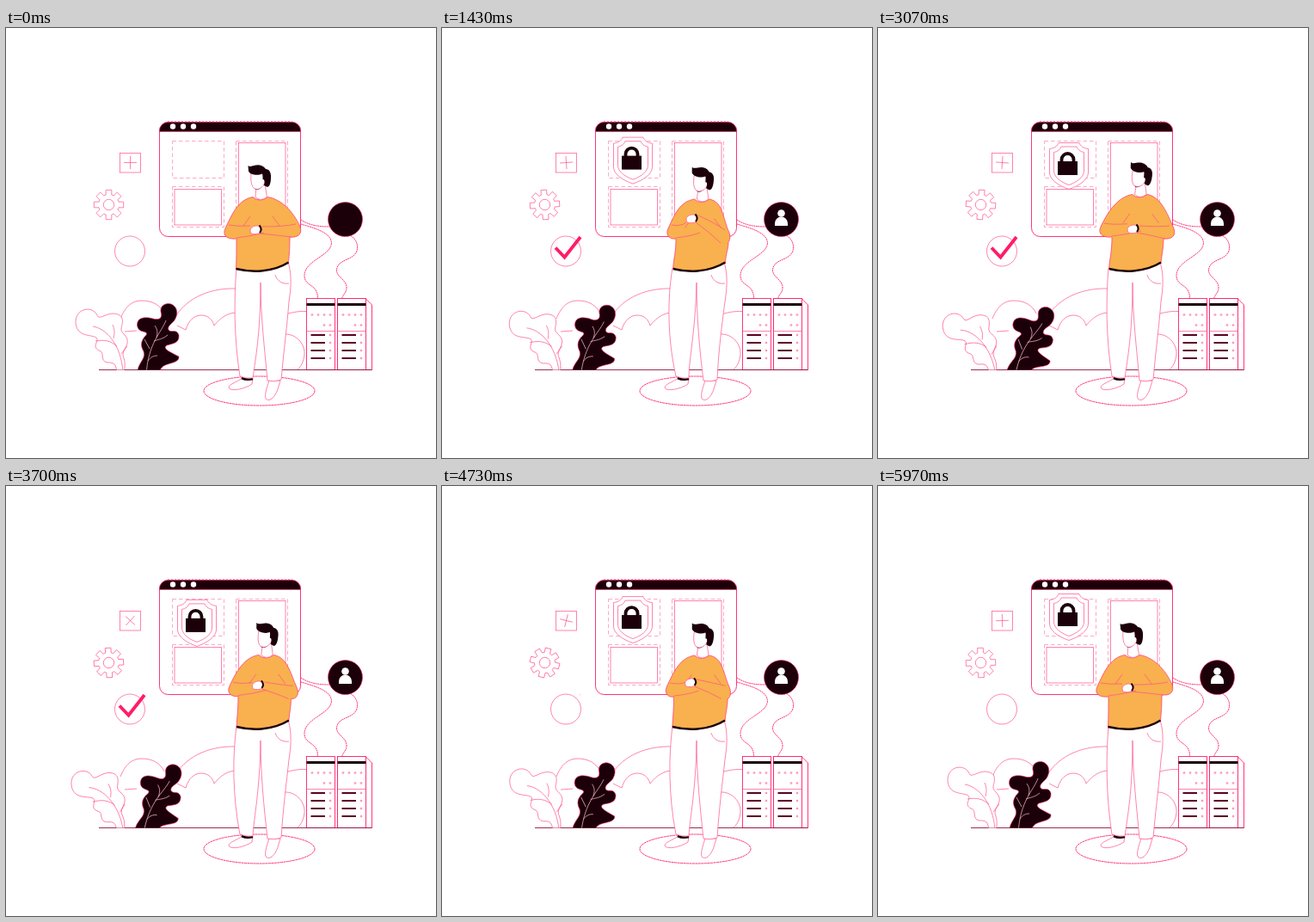
An HTML page that plays this animation: 500x500 px, repeating every 6000 ms.

```html
<!DOCTYPE html>
<html lang="en">
<head>
<meta charset="utf-8">
<style>
  html, body { margin: 0; width: 100%; height: 100%; overflow: hidden; background: #fff; }
  svg { display: block; width: 100vw; height: 100vh; }
  .line { fill: none; stroke: #ff4f8c; stroke-width: .7; }
  .solid { fill: #fff; stroke: #ff4f8c; stroke-width: .7; }
  .strong { stroke: #ff1f6c; stroke-width: .9; }
  .dark { fill: #1c0009; stroke: #ff2a74; stroke-width: .6; }
  .ink { fill: #1c0009; }
  .white { fill: #fff; }
  .dash { stroke: #ff85ae; stroke-dasharray: 4.5 3; }
  .vein { fill: none; stroke: #ffc4d8; stroke-width: .7; }
  .shirt { fill: #f9b04e; stroke: #ff2a74; stroke-width: .7; }
</style>
</head>
<body>
<svg viewBox="0 0 500 500">
  <defs><clipPath id="above"><path d="M0 0H500V397.5H0Z"/></clipPath></defs>

  <!-- clouds -->
  <g class="line">
    <path d="M133 338C139 323 147 317 158 317C171 317 180 323 184 332"/>
    <path d="M198 334C212 313 238 302 268 303"/>
    <path d="M199 346L209 351C212 340 219 334 227 334C235 334 240 339 242 346C249 337 258 331 268 331"/>
    <path d="M322 334C330 331 340 329 349 329.5M323 356C338 355 348 368 347 380C346 388 343 394 339 397M138 353L152 352"/>
  </g>

  <!-- browser window -->
  <rect class="solid strong" x="178.5" y="109.5" width="164" height="133" rx="10"/>
  <path class="dark" d="M178.500 120.500V119.500A10 10 0 0 1 188.500 109.500H332.500A10 10 0 0 1 342.500 119.500V120.500Z"/>
  <path d="M188 109H333" stroke="#ff2a74" stroke-dasharray="2 2"/>
  <g class="white"><circle cx="194" cy="114.500" r="3.200"/><circle cx="206" cy="114.500" r="3.200"/><circle cx="218" cy="114.500" r="3.200"/></g>
  <g class="line">
    <rect class="dash" x="193.500" y="131.500" width="60" height="43"/>
    <rect class="dash" x="193.500" y="184.500" width="60" height="47"/>
    <rect class="dash" x="267.500" y="131.500" width="60" height="100"/>
    <rect x="196" y="187.500" width="54.500" height="41.500"/>
    <rect x="270.500" y="133.500" width="54.500" height="95"/>
  </g>
  <g id="shield">
    <path class="solid" d="M210 125.500H234C235 129 239 132 244.500 132.500V160C244.500 168 235 175 222 179.500C209 175 199.500 168 199.500 160V132.500C205 132 209 129 210 125.500Z"/>
    <path class="line" d="M213 130H231C232 133 235 136 239.500 136.500V158C239.500 165 232 171 222 174.500C212 171 204.500 165 204.500 158V136.500C209 136 212 133 213 130Z"/>
    <rect class="ink" x="209" y="147" width="23" height="16"/>
    <path d="M213.500 148V145A7 7 0 0 1 227.500 145V148" fill="none" stroke="#1c0009" stroke-width="3.800"/>
  </g>

  <!-- floating icons -->
  <rect class="line" x="132.500" y="145.500" width="24" height="22.500"/>
  <path id="plus" class="line" d="M137 156.500H152M144.500 149V164"/>
  <g id="gear"><path id="cog" class="line"/><circle class="line" cx="119.500" cy="205.500" r="6.200"/></g>
  <circle class="line" cx="144" cy="259.500" r="17.500"/>
  <path id="check" d="M132 255.500L142.500 266.500L161 243" pathLength="100" fill="none" stroke="#ff1c69" stroke-width="3.800"/>

  <!-- cables, account badge, servers -->
  <g class="line strong" stroke-dasharray="2 .6">
    <path d="M343 223C350 228 360 231 376 231"/>
    <path d="M343 228C356 232 378 237 378.500 250C378 265 347 270 347 288C347 301 363 297 362.500 315"/>
    <path d="M398 240C407 244 410 252 408 259C404 271 386 268 384.500 281C384 290 396 292 396 302C396 308 392 309 390.500 315"/>
  </g>
  <circle class="dark" cx="394.500" cy="222.500" r="20"/>
  <g id="user" class="white"><circle cx="394.500" cy="215.500" r="4.300"/><path d="M387 230V227A7.500 7.500 0 0 1 402 227V230Z"/></g>
  <path class="solid strong" d="M385.500 314.500H418L425.500 322V397.500H385.500ZM418 314.500V397.500"/>
  <g id="servers"></g>
  <path d="M108 397.500H425.500" stroke="#8d1743" stroke-width=".9"/>

  <!-- leaves -->
  <g clip-path="url(#above)">
    <g id="paleLeaf">
      <path class="solid" d="M129 402C128 390 126 389 118 389C108 387 116 377 108 375C99 370 109 364 105 360C99 356 81 360 81 341C82 325 101 323 106 334C108 340 115 332 125 332C138 333 136 342 134 349C133 356 143 357 141 367C139 373 134 377 137 384C139 390 138 396 137 402Z"/>
      <path class="line" d="M101 347C116 349 134 368 136 400M124 345C127 352 126 356 125 361M104 364C115 362 122 364 129 370M141 370L134 379"/>
    </g>
    <g id="darkLeaf">
      <path class="dark" d="M152 404C153 388 163 386 160 376C155 368 158 362 163 357C166 351 154 356 152.500 346C152 335 164 336 171 338C179 340 182 337 180 330C179 323 185 320 190 320.500C198 322 201 330 197 338C195 343 187 346 189 351C192 355 198 349 201 357C202 367 193 367 187 369C181 373 192 377 201 382C202 390 188 389 182 394L174 404Z"/>
      <path class="vein" d="M186 340C181 354 165 366 163 404M173 346C177 352 176 355 175 360M188 357C182 362 177 362 172 364M161 362L167 373M176 381C171 381 168 383 165 387"/>
    </g>
  </g>

  <!-- man -->
  <ellipse class="line strong" cx="294.500" cy="422" rx="64.500" ry="17" stroke-dasharray="3 .5"/>
  <path class="solid" d="M275 407C268 412 259 414 259 418.500C262 423 277 420 286 414L287 407Z"/>
  <path class="solid" d="M306 410C303 419 300 428 302.500 431.500C307 435 313 429 316 420L319 410Z"/>
  <path d="M274 407C278 409 283 409 287 408" fill="none" stroke="#1c0009" stroke-width="2.600"/>
  <path id="legs" class="solid"/>
  <path class="line" d="M313 287C315 294 321 298 329 297"/>
  <path id="torso" class="shirt"/>
  <path id="hem" fill="none" stroke="#1c0009" stroke-width="2.600"/>
  <path id="folds" class="line"/>
  <g id="hand">
    <path class="solid" d="M-6 1C-6 -3 -2 -5 2 -5L7 -4L6 3C3 5 -2 5 -5 4Z"/>
    <path d="M4.500 -5.500Q8.500 -1 5 3" fill="none" stroke="#1c0009" stroke-width="2"/>
  </g>
  <path id="neck" class="solid"/>
  <g id="head">
    <path class="ink" d="M289 187Q293 190 297 185L292 185Z"/>
    <path class="solid" d="M285 168C284 180 286 187.500 292 187.500C297 187 300 183 301 179L300 167Z"/>
    <path class="ink" d="M281.500 160C285 163 290 157.500 297 160C300 161 301 163 302 164C306 164 308.500 168 308 174C308 181 306 186 303 184.500L300 183C301 179 301 177 299.500 176C298 178 299 172 298 169.500C293 172 284 171 282 166.500Z"/>
  </g>
</svg>

<script>
const LOOP = 6000;
const $ = id => document.getElementById(id);
const set = (id, name, value) => $(id).setAttribute(name, value);
const clamp = x => Math.max(0, Math.min(1, x));
const ease = (t, from, to) => { const x = clamp((t - from) / (to - from)); return x * x * (3 - 2 * x); };

// time, headX, headY, left elbow x y, right elbow x y, hand x y, left side, right side, knee
const poses = [
  [0, 0, 0, 254, 238, 342, 237, 290, 235, 268, 330, 0],
  [1430, 8.500, 2.500, 262, 238, 334, 244, 290, 222, 272, 333, -3],
  [2170, 7.500, -1, 259, 238, 338, 238, 289, 227, 270, 331, 0],
  [3070, 11.500, -3, 258, 236, 344, 239, 296, 234, 272, 332, 0],
  [4330, 6.500, 2.500, 260, 239, 333, 243, 288, 229, 268, 331, -3],
  [5130, 10, -2, 260, 237, 338, 239, 290, 230, 271, 333, 0]
];

// Periodic cubic through the poses
function poseAt(t) {
  const n = poses.length;
  const key = i => {
    const turn = Math.floor(i / n), p = poses[i - turn * n];
    return [p[0] + turn * LOOP, ...p.slice(1)];
  };
  let i = n - 1;
  while (poses[i][0] > t) i--;
  const [a, b, c, d] = [key(i - 1), key(i), key(i + 1), key(i + 2)];
  const span = c[0] - b[0], u = (t - b[0]) / span, v = 1 - u;
  return b.slice(1).map((y0, j) => {
    const k = j + 1, y1 = c[k];
    const m0 = (y1 - a[k]) / (c[0] - a[0]) * span;
    const m1 = (d[k] - y0) / (d[0] - b[0]) * span;
    return y0 * (1 + 2 * u) * v * v + m0 * u * v * v + y1 * u * u * (3 - 2 * u) - m1 * u * u * v;
  });
}

function buildGear() {
  const points = [];
  for (let tooth = 0; tooth < 8; tooth++) {
    for (const [deg, r] of [[-16, 12], [-11, 17.500], [11, 17.500], [16, 12]]) {
      const a = (tooth * 45 + deg) * Math.PI / 180;
      points.push((119.500 + r * Math.sin(a)).toFixed(2) + ' ' + (205.500 - r * Math.cos(a)).toFixed(2));
    }
  }
  set('cog', 'd', 'M' + points.join('L') + 'Z');
}

function buildServers() {
  const light = (x, y) => `<circle class="line" cx="${x}" cy="${y}" r=".9"/>`;
  $('servers').innerHTML = [349.500, 385.500].map(x => {
    let s = `<rect class="solid strong" x="${x}" y="314.500" width="33" height="83"/>
      <rect class="ink" x="${x}" y="320" width="33" height="3"/>
      <path class="line" d="M${x} 352.500h33"/>`;
    for (const dx of [6.500, 13.500, 20.500, 27.500]) s += light(x + dx, 333.500);
    s += light(x + 20.500, 345.500) + light(x + 27.500, 345.500);
    for (const y of [357, 366, 375, 384]) {
      s += `<path d="M${x + 5} ${y}h16.500" stroke="#5c0024" stroke-width="2"/>` + light(x + 27.500, y);
    }
    return s;
  }).join('');
}

function drawMan(t) {
  const [hx, hy, ex, ey, rx, ry, px, py, sl, sr, knee] = poseAt(t);
  const cx = hx * .75, cy = hy, nl = 287 + cx, nr = 304.500 + cx, ny = 196.500 + cy;
  const hl = 267.500 + (sl - 268) * .3, hr = 328.500 + (sr - 330) * .3;
  const hem = `C284 284 309 285 ${hr} 272.500`;
  set('head', 'transform', `translate(${hx * .8} ${hy}) rotate(${hx * .6} 292 187)`);
  set('neck', 'd', `M${291 + hx * .8} ${185 + hy}L${nl + 3} ${ny}Q${nl + 9} ${ny + 6} ${nr - 1} ${ny}L${301 + hx * .8} ${181 + hy}Z`);
  set('hand', 'transform', `translate(${px} ${py})`);
  set('torso', 'd', `M${nl} ${ny}C${nl - 17} ${ny + 3} ${ex + 9} ${ey - 22} ${ex + 1} ${ey - 5}
    C${ex - 3} ${ey + 4} ${ex + 4} ${ey + 8} ${sl} ${ey + 7}
    C${sl} 262 ${hl + .5} 268 ${hl} 280${hem}
    C${hr + 1} 262 ${sr} 256 ${sr} ${ry + 6}
    C${rx - 3} ${ry + 7} ${rx + 3} ${ry + 3} ${rx} ${ry - 6}
    C${rx - 8} ${ry - 24} ${nr + 16} ${ny + 3} ${nr} ${ny}Q${nl + 8} ${ny + 7} ${nl} ${ny}Z`);
  set('hem', 'd', `M${hl} 280${hem}`);
  set('folds', 'd', `M${ex + 5} ${ey - 9}Q${ex + 16} ${ey - 7} ${px - 6} ${ey - 8 + (py - 235) * .3}
    M${sl} ${ey + 6}Q${sl + 18} ${ey + 4} ${px + 10} ${ey}
    M${px + 8} ${py - 4}Q${(px + rx) / 2 + 8} ${(py + ry) / 2 - 5} ${rx - 5} ${ry - 9}
    M${px + 5} ${py + 4}Q${(px + rx) / 2} ${(py + ry) / 2 + 5} ${rx - 10} ${ry + 6}
    M${284 + cx} ${219 + cy}l-8 11M${310 + cx} ${219 + cy}l8 11`);
  set('legs', 'd', `M268 279C${265 + knee} 315 ${265 + knee} 360 272 405Q279 408 287 407
    C${290 + knee} 385 ${296 + knee * .5} 355 296 296C296 335 ${301 + knee * .5} 375 304 410Q312 412 320 409
    C${323 + knee * .5} 375 ${327 + knee * .5} 345 329 318C331 305 333 288 328 272Q300 286 268 279Z`);
}

function draw(t) {
  const sway = (1 - Math.cos(t / LOOP * 2 * Math.PI)) / 2;
  const spin = t / LOOP * 360;
  const pop = ease(t, 0, 700);
  const bob = 8 * (ease(t, 800, 3000) - ease(t, 3000, 6000));
  set('paleLeaf', 'transform', `rotate(${-6.300 * sway} 137 397)`);
  set('darkLeaf', 'transform', `rotate(${7.600 * sway} 162 378)`);
  set('plus', 'transform', `rotate(${spin} 144.500 156.500)`);
  set('gear', 'transform', `rotate(${spin} 119.500 205.500)`);
  set('shield', 'transform', `translate(222 ${152 + bob}) scale(${pop}) translate(-222 -152)`);
  set('user', 'transform', `translate(394.500 222.500) scale(${pop}) translate(-394.500 -222.500)`);

  const start = 100 * ease(t, 4000, 4750), end = 100 * ease(t, 500, 1200);
  set('check', 'visibility', end - start > .1 ? 'visible' : 'hidden');
  set('check', 'stroke-dasharray', `0 ${start} ${Math.max(0, end - start)} 200`);
  drawMan(t);
}

buildGear();
buildServers();
const begin = performance.now();
function tick() {
  draw((performance.now() - begin) % LOOP);
  requestAnimationFrame(tick);
}
draw(0);
requestAnimationFrame(tick);
</script>
</body>
</html>
```
